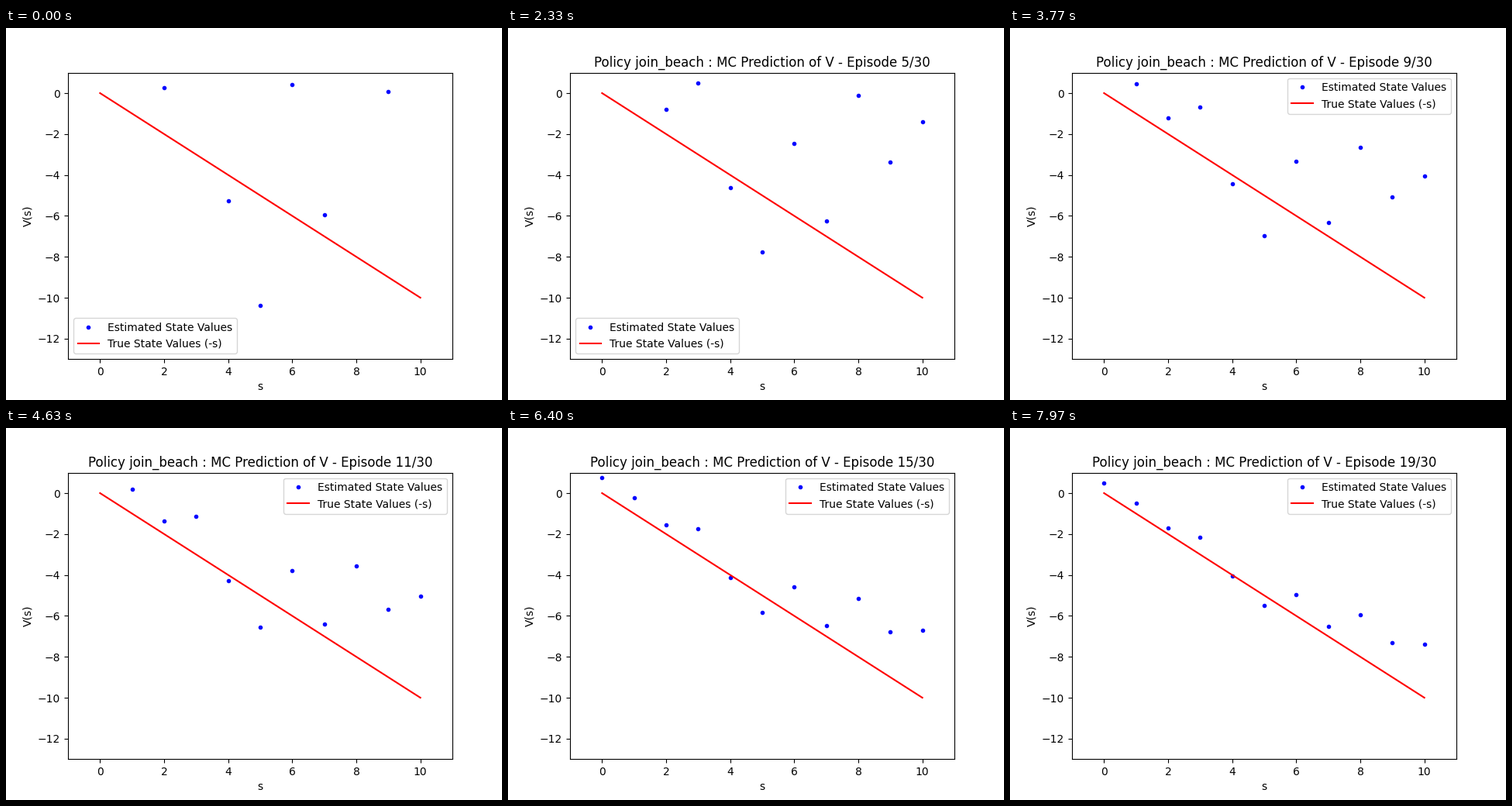
Recreate the animation shown at these times as a matplotlib script. Size 640 by 480 pixels, loop 8 s.

```python
import numpy as np
import matplotlib.pyplot as plt
from matplotlib.animation import FuncAnimation

ALPHA, GAMMA = 0.1, 0.98
EPISODES = 30
FRAMES, LOOP_MS = 240, 8000

states = np.arange(11)
returns = -(1 - GAMMA ** states) / (1 - GAMMA)
start = np.array([4.07, 3.16, 0.26, 3.51, -5.27, -10.37,
                  0.407, -5.934, 5.0, 0.057, 3.96])
STEPS = len(states) + 1  # one title frame, then one state per frame

fig, ax = plt.subplots(figsize=(6.4, 4.8), dpi=100)
dots, = ax.plot(states, start, "b.", label="Estimated State Values")
ax.plot(states, -states, "r-", label="True State Values (-s)")
ax.set_xlim(-1, 11)
ax.set_ylim(-13, 1)
ax.set_xlabel("s")
ax.set_ylabel("V(s)")
ax.legend(loc="best")
title = ax.set_title("")


def values(episode, step):
    """State values once the first `step` states of `episode` are updated."""
    visits = episode + (states < step)
    return returns + (start - returns) * (1 - ALPHA) ** visits


def update(frame):
    if frame == 0:
        dots.set_ydata(start)
        title.set_text("")
    else:
        episode, step = divmod(frame - 1, STEPS)
        dots.set_ydata(values(episode, step))
        title.set_text("Policy join_beach : MC Prediction of V - "
                       f"Episode {episode}/{EPISODES}")
    return dots, title


anim = FuncAnimation(fig, update, frames=FRAMES, interval=LOOP_MS / FRAMES,
                     init_func=lambda: update(0), repeat=True, blit=False)
plt.show()
```
